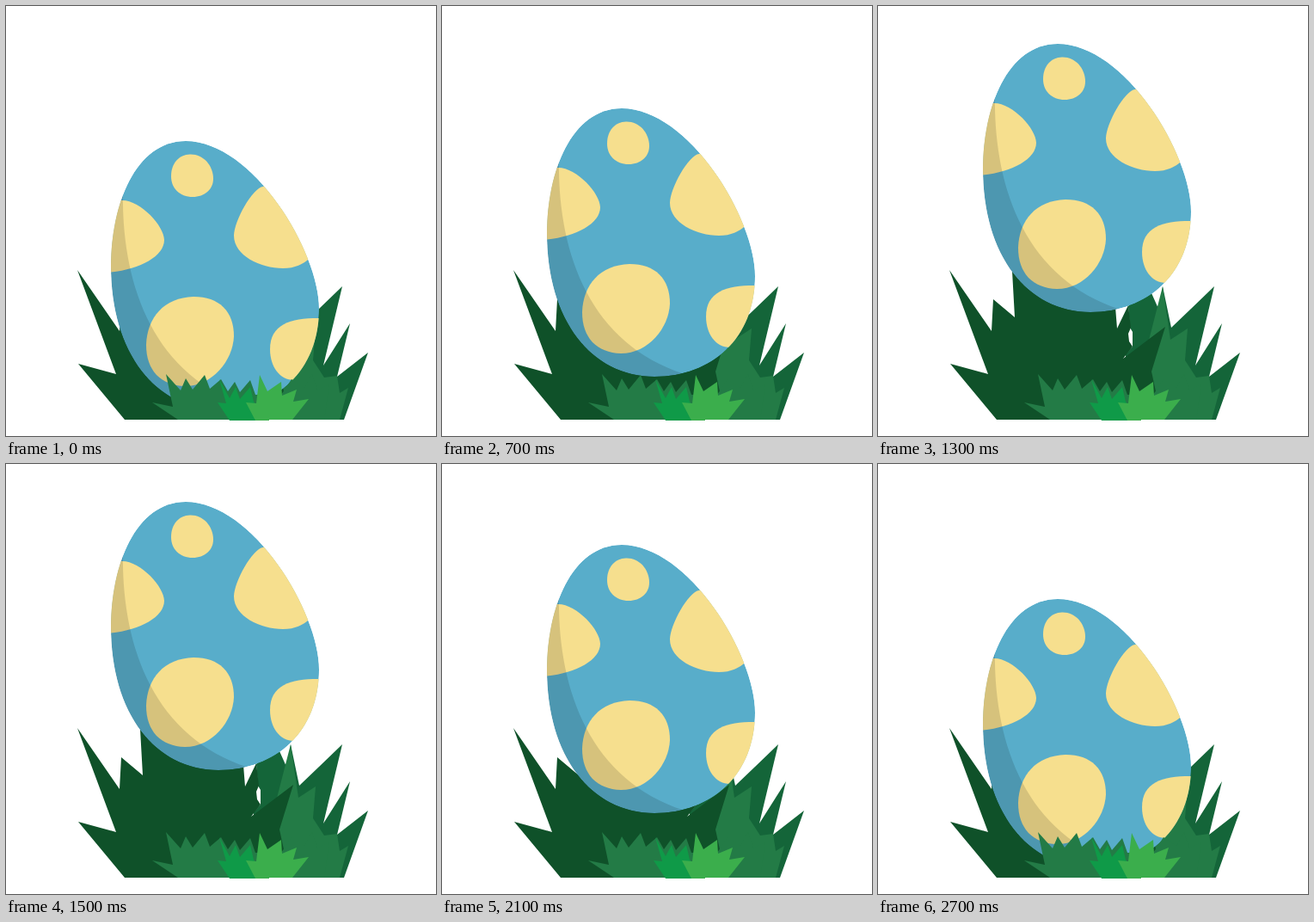
These frames come from a looping animation (500x500 px, 2800 ms). An HTML page:

```html
<!DOCTYPE html>
<html lang="en">
<head>
<meta charset="utf-8">
<title>Egg in the grass</title>
<style>
  html, body { margin: 0; width: 100%; height: 100%; overflow: hidden; background: #fff; }
  svg { display: block; width: 100vw; height: 100vh; }
</style>
</head>
<body>
<svg viewBox="0 0 500 500">
  <defs>
    <clipPath id="shell">
      <path id="outline" d="M209 157C150 157 122 232 122 302C122 404 174 469 247 469C314 469 364 424 364 352C364 285 287 157 209 157Z"/>
    </clipPath>
  </defs>

  <g id="back">
    <path fill="#146539" d="M290 481L288 405L296 396L296 379L293 374L291 349L304 335L314 325L327 354L331 326L341 374L364 352L391 326L369 418L400 369L385 431L421 403L393 481Z"/>
    <path fill="#237b46" d="M290 481L312 400L331 326L340 388L360 375L357 412L370 432L385 430L388 450L398 444L388 481Z"/>
    <path fill="#0f5129" d="M138 481L84 416L128 428L83 307L132 378L134 341L159 362L156 308L215 325L276 350L278 375L291 348L294 374L291 381L292 390L296 396L285 410L334 373L318 425L330 481Z"/>
  </g>

  <g id="egg" clip-path="url(#shell)">
    <use href="#outline" fill="#58adca"/>
    <g fill="#f6df8e">
      <path d="M214 172.500C229 172 241 185 241 201C241 213 231 222 217 222C202 222 192 212 192 198C192 183 201 173 214 172.500Z"/>
      <path d="M100 226H134C156 225 184 256 184 272C184 293 150 309 110 310.500Z"/>
      <path d="M299 210C287 211 265 250 265 267C265 290 296 305 322 305C336 305 346 300 352 294L380 250L310 205Z"/>
      <path d="M218 338C248 338 265 355 265 384C264 412 240 442 208 442C180 441 163 424 163 394C164 362 184 339 218 338Z"/>
      <path d="M370 363C334 362 307 368 307 399C307 419 318 435 335 435L370 430Z"/>
    </g>
    <path fill="#000" opacity=".13" d="M136 215C134 322 170 430 282 466L240 490L100 470V215Z"/>
  </g>

  <g id="front">
    <path fill="#237b46" d="M200 481L170 461L194 466L186 428L203 447L209 433L217 446L231 429L237 445L250 434L258 448L266 437L272 449L284 435L290 452L320 452L332 434L347 444L356 428L362 447L376 440L370 481Z"/>
    <path fill="#0f9a48" d="M260 482L246 461L256 462L248 434L260 456L267 443L272 457L284 443L288 460L300 482Z"/>
    <path fill="#3bae4c" d="M290 482L279 461L291 462L295 429L304 448L320 437L321 453L338 446L334 460L352 457L333 481H306V482Z"/>
  </g>
</svg>
<script>
  const LOOP = 2800, STEP = 100;
  const egg = document.getElementById('egg');

  // [time, lift]: rise, bob at the top, drop
  const keys = [[0, 0], [400, 0], [1400, 125], [1500, 112.5], [1600, 125], [2100, 62.5], [2500, 0], [LOOP, 0]];

  function lift(t) {
    const i = keys.findIndex(k => k[0] > t);
    const [t0, y0] = keys[i - 1], [t1, y1] = keys[i];
    return y0 + (y1 - y0) * (t - t0) / (t1 - t0);
  }

  const start = performance.now();

  function draw(now) {
    const t = Math.max(0, now - start) % LOOP;
    const y = Math.round(lift(Math.floor(t / STEP) * STEP));
    egg.setAttribute('transform', `translate(0 ${-y})`);
    requestAnimationFrame(draw);
  }
  draw(start);
</script>
</body>
</html>
```
